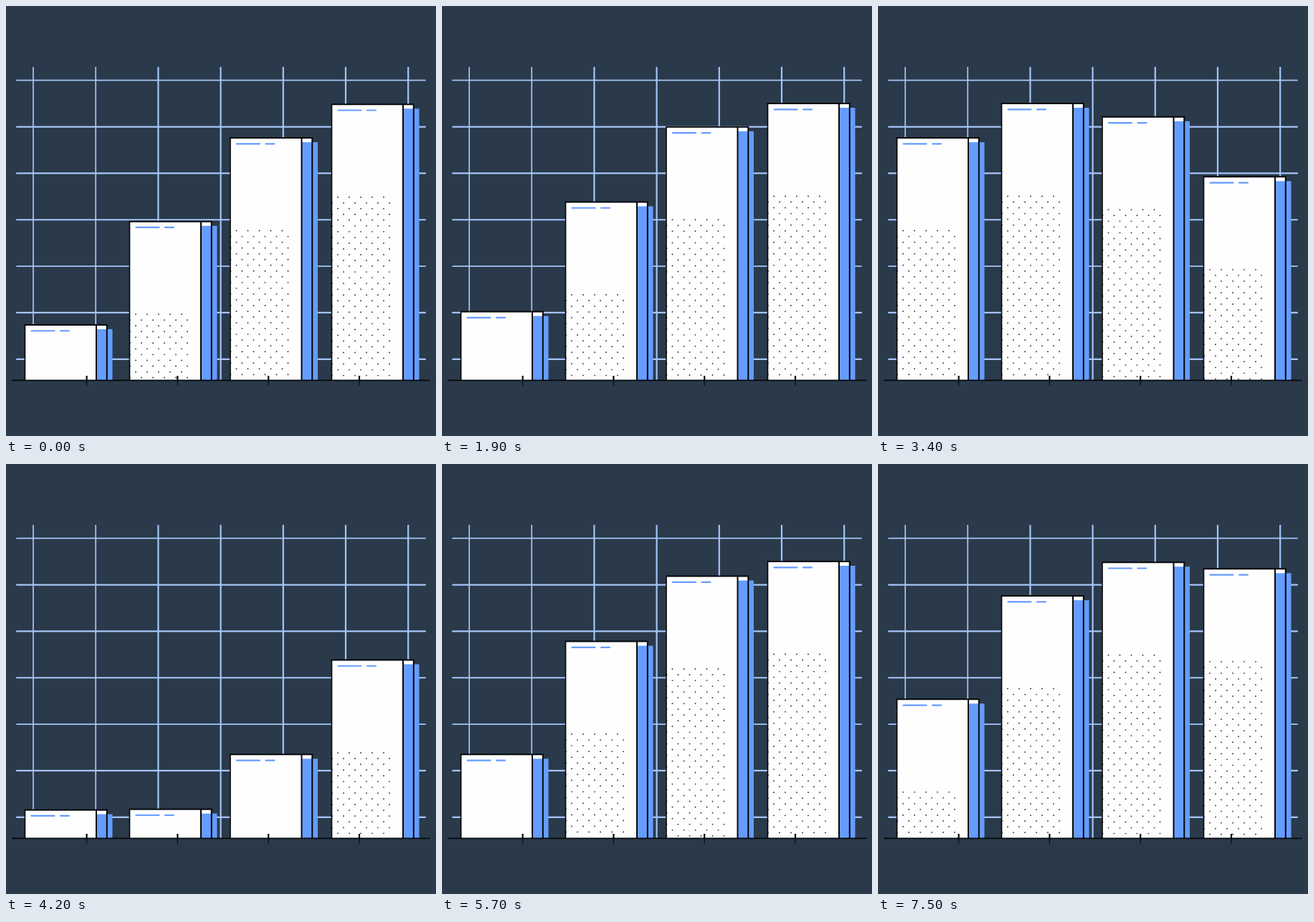
Recreate the animation shown at these times as an HTML page with a canvas. Size 600 by 600 pixels, loop 7600 ms.

```html
<!DOCTYPE html>
<html>
<head>
<meta charset="utf-8">
<style>
html, body { margin: 0; width: 100%; height: 100%; overflow: hidden; background: #2a3a4a; }
canvas { display: block; width: 600px; height: 600px; }
</style>
</head>
<body>
<canvas id="stage" width="600" height="600"></canvas>
<script>
const ctx = document.getElementById('stage').getContext('2d');
// The motion runs at 25 fps and is shown at 10 fps.
const LOOP = 7600, STEP = 100, TICK = 40;
const FALL = 920, RISE = 960, HOLD = 40, PERIOD = FALL + RISE + HOLD, START = 680;
const LOW = 493, HIGH = 136, BASE = 522;
const NAVY = '#2a3a4a', PALE = '#a6c5fa', BLUE = '#659cff', BLACK = '#05070a', WHITE = '#fefeff';
const bars = [
  { x: 26.5, lag: 0 },
  { x: 172.5, lag: 240 },
  { x: 313, lag: 440 },
  { x: 454.5, lag: 640 }
];

function rect(x, y, w, h, color) {
  ctx.fillStyle = color;
  ctx.fillRect(x, y, w, h);
}

function line(x1, y1, x2, y2, color, width, cap = 'butt') {
  ctx.strokeStyle = color;
  ctx.lineWidth = width;
  ctx.lineCap = cap;
  ctx.beginPath();
  ctx.moveTo(x1, y1);
  ctx.lineTo(x2, y2);
  ctx.stroke();
}

// cubic-bezier(.44, 0, .56, 1), solved by bisection
function ease(x) {
  let lo = 0, hi = 1, s;
  for (let i = 0; i < 24; i++) {
    s = (lo + hi) / 2;
    const r = 1 - s;
    if (1.32 * r * r * s + 1.68 * r * s * s + s * s * s < x) lo = s;
    else hi = s;
  }
  return s * s * (3 - 2 * s);
}

// Fall from the peak, rise again, then hold briefly.
function barTop(t, lag) {
  const u = (t + START - lag) % PERIOD;
  const drop = u < FALL ? ease(u / FALL) : 1 - ease(Math.min(1, (u - FALL) / RISE));
  return HIGH + (LOW - HIGH) * drop;
}

function drawGrid() {
  for (let i = 0; i < 7; i++) {
    const x = 38 + i * 87.2, y = 103.7 + i * 64.85;
    line(x, 85, x, BASE, PALE, i < 2 ? 1.7 : 2.2);
    line(15, y, 585, y, PALE, i % 4 ? 2.2 : 1.7, 'round');
  }
}

function drawDots(x, top) {
  ctx.fillStyle = '#30343a';
  for (let row = 0, y = top + 129.5; y < BASE - 0.5; row++, y += 8.03) {
    const odd = row % 2;
    for (let k = 0; k < 5 + odd; k++) {
      ctx.beginPath();
      ctx.arc(x + (odd ? 0.5 : 8.5) + k * 16, y, 0.95, 0, 7);
      ctx.fill();
    }
  }
}

function drawBar(x, top) {
  const h = BASE - top;
  rect(x + 114, top + 6, 8, h - 6, BLUE);
  rect(x, top, 114.3, h, WHITE);
  rect(x + 99.5, top + 6, 14.8, h - 6, BLUE);
  drawDots(x, top);
  line(x + 9, top + 8.3, x + 41, top + 8.3, BLUE, 2.2, 'round');
  line(x + 49.5, top + 8.3, x + 61.5, top + 8.3, BLUE, 2.2, 'round');
  line(x, top, x, BASE, BLACK, 1.6);
  line(x - 0.8, top, x + 115.2, top, BLACK, 2);
  line(x + 99.5, top, x + 99.5, BASE, BLACK, 2);
  line(x + 114.3, top, x + 114.3, BASE, BLACK, 2);
}

function drawAxis() {
  line(8, BASE + 0.3, 592, BASE + 0.3, BLACK, 1.7);
  for (let i = 0; i < 4; i++) {
    const x = 112.6 + i * 126.8;
    line(x, 516, x, 524, BLACK, 2.2);
    line(x, 524, x, 529.5, BLACK, 1.2);
  }
}

const floorTo = (value, unit) => Math.floor(value / unit) * unit;

function draw(now) {
  const t = floorTo(floorTo(now % LOOP, STEP), TICK);
  rect(0, 0, 600, 600, NAVY);
  drawGrid();
  for (const { x, lag } of bars) drawBar(x, barTop(t, lag));
  drawAxis();
}

const begin = performance.now();
function tick() {
  draw(performance.now() - begin);
  requestAnimationFrame(tick);
}
tick();
</script>
</body>
</html>
```
